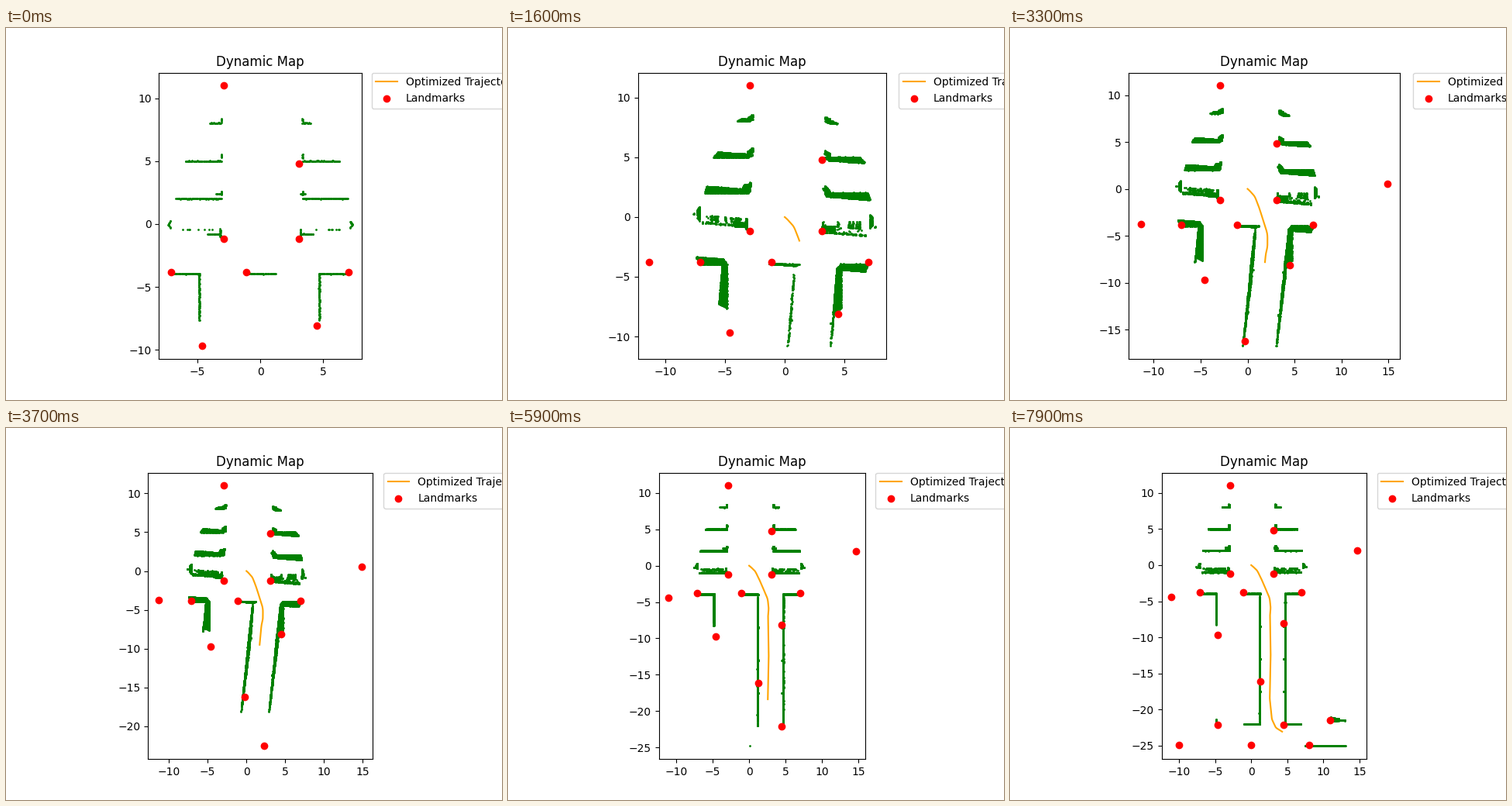
A matplotlib script for the animation above (8000 ms loop, 640 px wide and 480 px high).

```python
import numpy as np
import matplotlib.pyplot as plt
from matplotlib.animation import FuncAnimation

FRAMES, STEP = 80, 100
OPTIMIZED = 39          # the pose graph is corrected from here on
SUB = 4                 # path samples per frame
rng = np.random.default_rng(4)

# frame, x, y
WAYPOINTS = [(0, 0, 0), (7, .25, -.2), (12, .83, -.75), (16, 1.38, -1.85),
             (24, 2.55, -4.55), (28, 2.7, -5.9), (31, 2.6, -6.7),
             (44, 2.7, -12.2), (59, 2.56, -18.4), (68, 2.85, -21.3),
             (74, 3.4, -22.5), (79, 4.28, -23.05)]

# first frame, x, y
LANDMARKS = [(0, -2.9, 11), (0, 3.1, 4.8), (0, -2.9, -1.2), (0, 3.1, -1.2),
             (0, -7.1, -3.8), (0, -1.1, -3.8), (0, 7, -3.8),
             (0, -4.6, -9.7), (0, 4.5, -8.1), (6, -11.1, -4.4),
             (27, 14.7, 2), (27, 1.3, -16.1), (35, 4.5, -22.1),
             (66, 0, -24.88), (68, 8, -24.88), (70, -4.6, -22.1),
             (72, 10.9, -21.5), (74, -9.95, -24.88)]


def drift(k):
    """Heading error of a pose, growing until the correction."""
    return np.where(k < OPTIMIZED, .122 * k / (k + 7), 0)


def rotate(xy, angle):
    x, y = xy.T
    return np.column_stack([x + y * angle, y - x * angle])


def reach(k):
    """Lowest corridor point seen so far."""
    return max(-22, -10.8 - .35 * (k - 16))


def smooth_path(points, half=4):
    t, x, y = np.array(points, float).T
    time = np.arange(t[-1] * SUB + 1) / SUB
    window = np.ones(2 * half + 1) / (2 * half + 1)
    axes = [np.pad(np.interp(time, t, v), half, mode="reflect",
                   reflect_type="odd") for v in (x, y)]
    return time, np.column_stack([np.convolve(v, window, "valid")
                                  for v in axes])


cloud = []              # blocks of (first frame, x, y)


def add(k, x, y):
    cloud.append(np.column_stack(np.broadcast_arrays(k, np.atleast_1d(x), y)))


def wall(x0, y0, x1, y1, first=0, last=18, gap=.05):
    """Scan a straight segment once in every frame from first to last."""
    n = max(2, int(np.hypot(x1 - x0, y1 - y0) / gap) + 1)
    for k in range(first, last + 1):
        t = np.linspace(0, 1, n)
        t[1:-1] += rng.uniform(-.4, .4, n - 2) / n
        dx, dy = rng.normal(0, .015, (2, n))
        add(k, x0 + (x1 - x0) * t + dx, y0 + (y1 - y0) * t + dy)


def build_rooms():
    for y, left, right, cap in [(8.03, 4, 4, .35), (5, 5.95, 6.3, .55),
                                (2.02, 6.7, 6.95, .6)]:
        last = int(18 - 1.5 * y)        # far rows leave the view first
        for inner, outer in ((-3.08, -left), (3.35, right)):
            wall(inner, y, outer, y, last=last)
            wall(inner, y + cap / 2, inner, y + cap, last=last)

    for s in (-1, 1):
        wall(3.2 * s, 2.4, 3.55 * s, 2.4)
        wall(3.2 * s, -.4, 3.2 * s, -1.05)
        wall(3.2 * s, -.8, 4.2 * s, -.8)
        wall(3.2 * s, -1, 6.8 * s, -1, 10, 26, .35)
        wall(7.15 * s, .22, 7.3 * s, -.05)
        wall(7.3 * s, -.05, 7.15 * s, -.3)
        wall(7.55 * s, -.27, 7.6 * s, -.27, 10, 11)
        posts = rng.uniform(3.5, 6.8, 8) * s
        for k in range(27):
            if k < 19:
                add(k, posts + rng.normal(0, .03, 8), -.42)
            if k > 8:
                add(k, rng.uniform(3.2, 6.7, 3) * s, rng.uniform(-.95, -.4, 3))

    for x, inner in ((-7.05, -4.85), (-1, 1.2), (7, 4.7)):
        wall(x, -3.95, inner, -3.95)
    for x in (-4.85, 4.7):
        wall(x, -3.95, x, -7.65)
    wall(-4.85, -7.6, -4.85, -8.2, 22, 24)


def build_corridor():
    for k in range(13, 52):
        top = min(-4 if k > 20 else -4.7, path[k * SUB, 1])
        for x in (1.15, 4.7):
            low = reach(k) + x * drift(k)
            n = int((top - low) / .2)
            y = np.append(rng.uniform(low, top, n), low)
            add(k, x + rng.normal(0, .015, n + 1), y)
    for y in (-8.5, -13, -17.5):
        k = int(-3 * y - 10)
        wall(1.15, y, 1.28, y, k, k + 3)
        wall(4.52, y, 4.7, y, k, k + 3)


def build_far_end():
    add(57, .1, -24.8)
    wall(4.7, -22, 6.85, -22, 64, 66)
    wall(1.15, -22, -.95, -22, 66, 68)
    wall(-4.85, -21.4, -4.85, -22, 70, 72)
    wall(10.9, -21.5, 12.95, -21.5, 72, 74)
    wall(11, -21.1, 12.1, -21.3, 74, 76)
    wall(7.5, -25, 13, -25, 74, 76)


def with_drift(rows):
    """Split rows of (first frame, x, y) into frames, true and drifted xy."""
    rows = np.asarray(rows, float)
    rows = rows[np.argsort(rows[:, 0], kind="stable")]
    return rows[:, 0], rows[:, 1:], rotate(rows[:, 1:], drift(rows[:, 0]))


time, path = smooth_path(WAYPOINTS)
build_rooms()
build_corridor()
build_far_end()
layers = [with_drift(rows) for rows in
          (np.concatenate(cloud), np.column_stack([time, path]), LANDMARKS)]

fig, ax = plt.subplots(figsize=(6.4, 4.8), dpi=100)
ax.set_title("Dynamic Map")
ax.set_aspect("equal", adjustable="box")
dots = ax.scatter([], [], s=1, c="green")
route, = ax.plot([], [], color="orange", label="Optimized Trajectory")
marks = ax.scatter([], [], c="red", label="Landmarks")
ax.legend(bbox_to_anchor=(1.05, 1), loc="upper left", borderaxespad=0)


def update(k):
    points, line, spots = [(true if k >= OPTIMIZED else drifted)[born <= k]
                           for born, true, drifted in layers]
    dots.set_offsets(points)
    route.set_data(*line.T)
    marks.set_offsets(spots)

    seen = np.concatenate([points, line, spots])
    low, high = seen.min(axis=0), seen.max(axis=0)
    pad = (high - low) * .05
    ax.set_xlim(low[0] - pad[0], high[0] + pad[0])
    ax.set_ylim(low[1] - pad[1], high[1] + pad[1])
    return dots, route, marks


anim = FuncAnimation(fig, update, frames=FRAMES, interval=STEP,
                     repeat=True, repeat_delay=0, blit=False)
plt.show()
```
